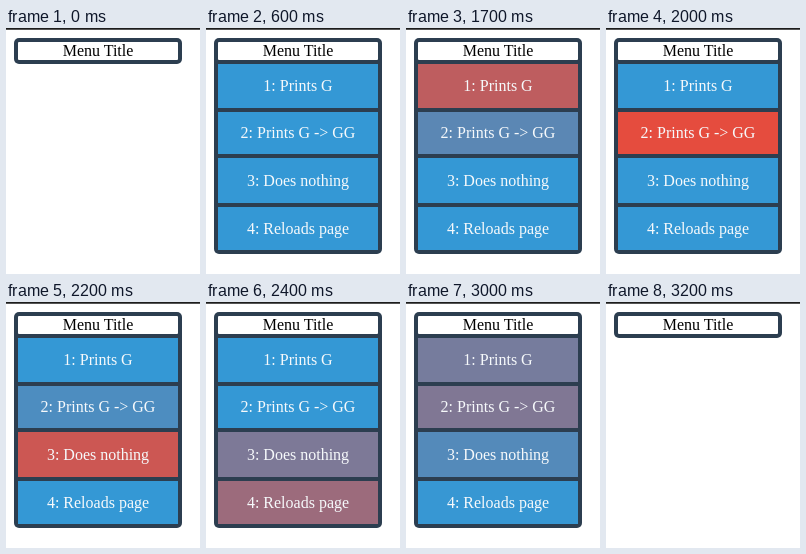
These frames come from a looping animation (194 by 246 pixels, 5100 ms). An HTML page:

```html
<!DOCTYPE html>
<html lang="en">
<head>
<meta charset="utf-8">
<title>Menu</title>
<style>
  html, body { margin: 0; width: 100%; height: 100%; overflow: hidden; background: #fff; }
  body { position: relative; font: 16px/18px "Liberation Serif", "Times New Roman", serif; }
  .edge { position: absolute; left: 0; top: 0; width: 100%; height: 2px; background: linear-gradient(#1c1c1c 1px, #555 1px); }
  .menu {
    position: absolute; left: 8px; top: 10px; width: 168px; height: 26px;
    border-radius: 5px; background: #2c3e50; overflow: hidden; text-align: center;
  }
  .menu.open { height: 216px; }
  .title, .item { position: absolute; left: 4px; width: 160px; box-sizing: border-box; }
  .title { top: 4px; height: 18px; background: #fff; color: #000; border-radius: 1px; }
  .item { color: #f6f9fb; }
</style>
</head>
<body>
<div class="edge"></div>
<div class="menu"><div class="title">Menu Title</div></div>
<script>
const LOOP = 5100, STEP = 100, OPEN = 600, CLOSE = 3200, FADE = 300;
const BLUE = [52, 152, 213], RED = [229, 76, 62];
const LABELS = ["1: Prints G", "2: Prints G -> GG", "3: Does nothing", "4: Reloads page"];
const TOPS = [26, 74, 120, 169, 216];
const BORDER = 4, TEXT_TOP = 39, TEXT_PITCH = 47.7;

// The pointer's path over the rows
const visits = [
  { row: 0, at: 1015 }, { row: 1, at: 1650 }, { row: 2, at: 2030 }, { row: 3, at: 2298 },
  { row: 2, at: 2750 }, { row: 1, at: 2850 }, { row: 0, at: 2930 }
];

const menu = document.querySelector(".menu");
const items = LABELS.map((label, i) => {
  const item = document.createElement("div");
  const textTop = TEXT_TOP + Math.floor(TEXT_PITCH * i);
  item.className = "item";
  item.textContent = label;
  item.style.top = TOPS[i] + "px";
  item.style.height = TOPS[i + 1] - TOPS[i] - BORDER + "px";
  item.style.paddingTop = textTop - TOPS[i] + "px";
  menu.append(item);
  return item;
});

// The CSS "ease" curve, solved by bisection
function ease(x) {
  if (x <= 0 || x >= 1) return x <= 0 ? 0 : 1;
  let low = 0, high = 1, s;
  for (let i = 0; i < 20; i++) {
    s = (low + high) / 2;
    if (0.75 * s * (1 - s) + s ** 3 < x) low = s; else high = s;
  }
  return 0.3 * s * (1 - s) ** 2 + 3 * s * s * (1 - s) + s ** 3;
}

function hover(row, time) {
  const faded = at => ease((time - at) / FADE);
  return visits.reduce((sum, visit, i) => {
    if (visit.row !== row) return sum;
    const leave = visits[i + 1] ? visits[i + 1].at : CLOSE;
    return sum + faded(visit.at) - faded(leave);
  }, 0);
}

function mix(amount) {
  return `rgb(${BLUE.map((c, i) => Math.round(c + (RED[i] - c) * amount))})`;
}

function draw() {
  const time = Math.floor(performance.now() % LOOP / STEP) * STEP;
  menu.classList.toggle("open", time >= OPEN && time < CLOSE);
  items.forEach((item, i) => item.style.background = mix(hover(i, time)));
  requestAnimationFrame(draw);
}
draw();
</script>
</body>
</html>
```
